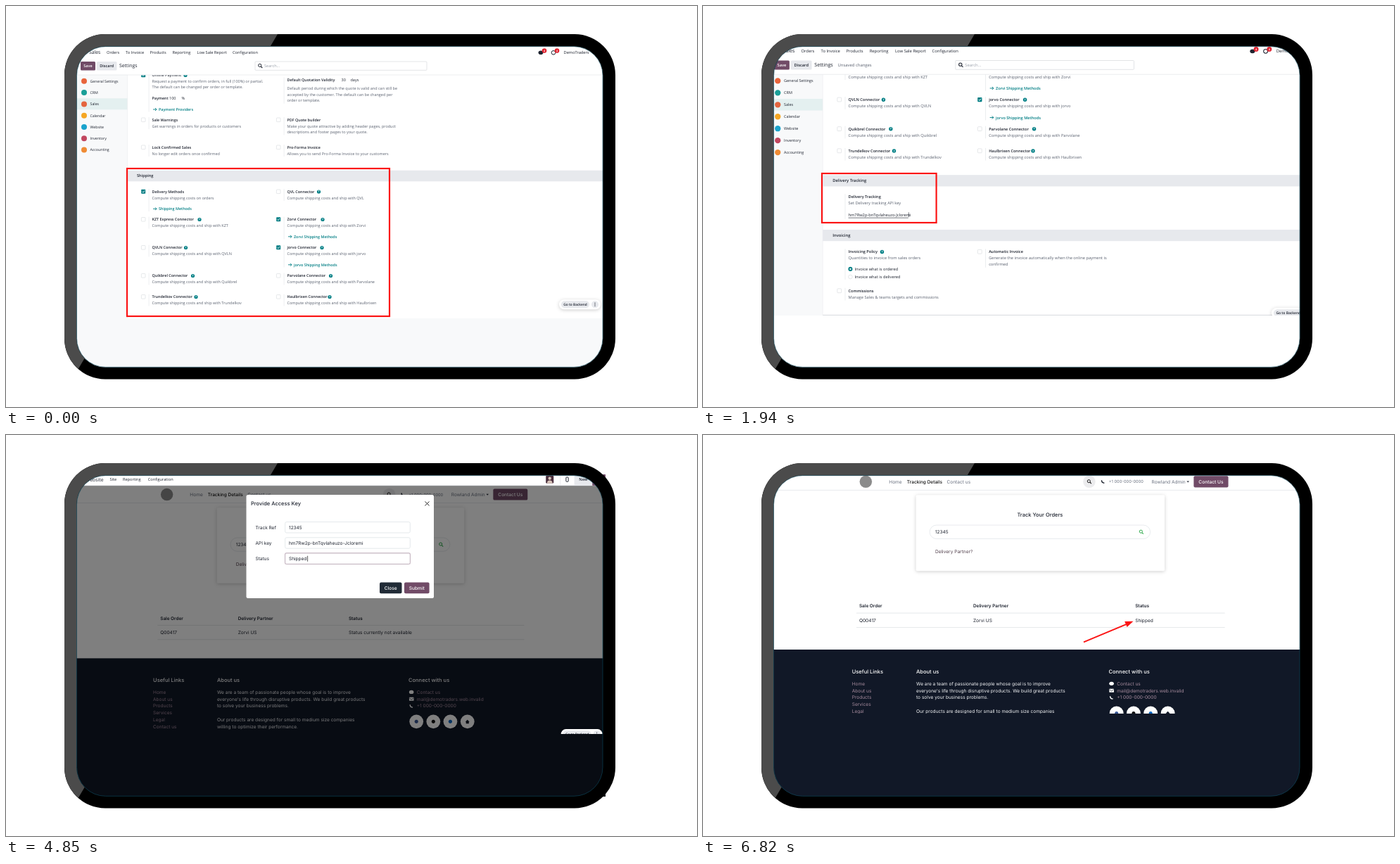
An HTML page for the animation above (7820 ms loop, 982x570 px).

```html
<!DOCTYPE html>
<html lang="en">
<head>
<meta charset="utf-8">
<title>Delivery tracking tour</title>
<style>
  html, body { margin: 0; width: 100%; height: 100%; overflow: hidden; background: #fff; }
  #stage { display: block; width: 982px; height: 570px; }
  text { text-rendering: geometricPrecision; }
  .ui { font-family: "Open Sans", "Noto Sans", sans-serif; }
  .web { font-family: Inter, Roboto, sans-serif; }
  /* Each scene shows for 1000 ms; a later one covers the tail of the one before. */
  .scene { animation: show 7820ms step-end infinite; }
  @keyframes show {
    0% { visibility: visible; }
    12.788%, 100% { visibility: hidden; }
  }
</style>
</head>
<body>
<svg id="stage" viewBox="0 0 982 570"></svg>
<script>
const TEAL = '#017e84', PLUM = '#714b67', INK = '#1f2430', GREY = '#6b7280', NAVY = '#111827', RED = '#fb1414';
const API_KEY = 'hm7Rw2p-bnTqvlaheuzo-Jcloremi';

// Drawing helpers; text y is the visual middle of the line.
const text = (x, y, s, size, fill = INK, weight = 400, anchor = 'start') =>
  `<text x="${x}" y="${y + size * 0.35}" font-size="${size}" fill="${fill}" font-weight="${weight}" text-anchor="${anchor}">${s}</text>`;
const box = (x, y, w, h, fill, r = 0, more = '') =>
  `<rect x="${x}" y="${y}" width="${w}" height="${h}" rx="${r}" fill="${fill}" ${more}/>`;
const dot = (x, y, r, fill) => `<circle cx="${x}" cy="${y}" r="${r}" fill="${fill}"/>`;
const line = (d, stroke, w = 0.7) => `<path d="${d}" fill="none" stroke="${stroke}" stroke-width="${w}"/>`;
const frame = (x, y, w, h) => box(x, y, w, h, 'none', 0, `stroke="${RED}" stroke-width="2.2"`);
const place = (scale, dx, dy, body) => `<g transform="translate(${dx} ${dy}) scale(${scale})">${body}</g>`;
const clip = (x, y, x2, y2, body) =>
  `<svg x="${x}" y="${y}" width="${x2 - x}" height="${y2 - y}" viewBox="${x} ${y} ${x2 - x} ${y2 - y}">${body}</svg>`;
const shadowed = (x, y, w, h, r) =>
  box(x, y, w, h, '#fff', r, 'style="filter:drop-shadow(0 1px 2.5px rgba(0,0,0,.2))"');
const lens = (x, y, color) =>
  `<circle cx="${x - 0.6}" cy="${y - 0.6}" r="2.1" fill="none" stroke="${color}" stroke-width="1"/>` +
  line(`M${x + 1} ${y + 1}l2 2`, color, 1.1);
const handset = (x, y, color) => line(`M${x - 2} ${y - 2}q0 4 4 4`, color, 1.5);
const button = (x, y, w, h, label, fill, size = 6.6) =>
  box(x, y, w, h, fill, 2) + text(x + w / 2, y + h / 2, label, size, '#fff', 500, 'middle');

const pill = (x, y) =>
  shadowed(x, y, 59, 14, 7) + box(x + 3, y + 2, 40, 10, '#e7e9ed', 5) +
  text(x + 23, y + 7, 'Go to Backend', 4.8, INK, 600, 'middle') +
  dot(x + 51, y + 7, 5, '#e7e9ed') +
  [-2, 0, 2].map(d => dot(x + 51, y + 7 + d, 0.6, INK)).join('');

// Settings page
const check = (x, y, on) => on
  ? box(x - 3, y - 3, 6, 6, TEAL, 0.8) + line(`M${x - 1.6} ${y}l1.2 1.3 2.2 -2.6`, '#fff', 0.9)
  : box(x - 2.8, y - 2.8, 5.6, 5.6, '#fff', 0.8, 'stroke="#d5d8dc" stroke-width=".6"');
const help = (x, y) => dot(x, y, 2.6, TEAL) + text(x, y, '?', 4.2, '#fff', 700, 'middle');

function item(x, y, title, lines, { on, mark, link, at = 8.6, tall = 0 } = {}) {
  let s = text(x, y, title, 5.4, INK, 600);
  lines.forEach((l, i) => s += text(x, y + at + i * 8.4, l, 5.5, '#5b6270'));
  if (on !== undefined) s += check(x - 12.3, y - 0.2, on);
  if (mark) s += help(mark, y);
  if (link) s += line(`M${x + 1.5} ${y + 24.3}h5m-2 -2l2 2l-2 2`, TEAL, 0.9) + text(x + 9.5, y + 24.4, link, 5.4, TEAL, 600);
  const h = tall || at + lines.length * 8.4 - 4 + (link ? 15 : 0);
  return s + line(`M${x - 4.4} ${y - 4}v${h + 4}`, '#dfe2e6', 0.6);
}
const carrier = (x, y, name, mark, on = false) => item(x, y, `${name} Connector`,
  [`Compute shipping costs and ship with ${name.replace(' Express', '')}`],
  { on, mark, link: on && `${name} Shipping Methods` });
const band = (y, title) => box(172.5, y, 700, 15.6, '#e7e9ed') + text(186, y + 7.8, title, 5.6, INK, 600);

function settingsBody(key) {
  const L = 207.5, R = 399.5;
  return item(L, 98.5, 'Online Payment', ['Request a payment to confirm orders, in full (100%) or partial.',
      'The default can be changed per order or template.'], { on: true, mark: 255, tall: 52 }) +
    text(L, 131, 'Payment', 5.4, INK, 600) + text(232, 131, '100', 5.5) + text(249.5, 131, '%', 5.5) +
    line('M209 147h5m-2 -2l2 2l-2 2', TEAL, 0.9) + text(217, 147, 'Payment Providers', 5.4, TEAL, 600) +
    item(R, 105.5, 'Default Quotation Validity', ['Default period during which the quote is valid and can still be',
      'accepted by the customer. The default can be changed per', 'order or template.'], { at: 12 }) +
    text(476.5, 105.5, '30', 5.5) + text(489.5, 105.5, 'days', 5.5) +
    item(L, 162, 'Sale Warnings', ['Get warnings in orders for products or customers'], { on: false }) +
    item(R, 162, 'PDF Quote builder', ['Make your quote attractive by adding header pages, product',
      'descriptions and footer pages to your quote.'], { on: false }) +
    item(L, 201, 'Lock Confirmed Sales', ['No longer edit orders once confirmed'], { on: false }) +
    item(R, 201, 'Pro-Forma Invoice', ['Allows you to send Pro-Forma Invoice to your customers'], { on: false }) +
    band(233.7, 'Shipping') +
    item(L, 264, 'Delivery Methods', ['Compute shipping costs on orders'], { on: true, link: 'Shipping Methods' }) +
    carrier(R, 264, 'QVL', 444.5) +
    carrier(L, 303.5, 'KZT Express', 275) + carrier(R, 303.5, 'Zorvi', 450, true) +
    carrier(L, 343.5, 'QVLN', 255.5) + carrier(R, 343.5, 'jorvo', 449, true) +
    carrier(L, 383.5, 'Quikbrel', 265.5) + carrier(R, 383.5, 'Parvolane', 461.5) +
    carrier(L, 413.5, 'Trundelkov', 270) + carrier(R, 413.5, 'Haulbrixen', 460) +
    band(446.4, 'Delivery Tracking') +
    item(L, 476.5, 'Delivery Tracking', ['Set Delivery tracking API key'], { tall: 30 }) +
    (key ? text(L, 500.6, key, 5.5) + line('M290 497.5v6.5', INK, 0.6) : '') +
    line(`M${L} 505h82`, INK, 0.6) +
    band(521.2, 'Invoicing') +
    item(L, 551.5, 'Invoicing Policy', ['Quantities to invoice from sales orders'], { mark: 253.6, tall: 38 }) +
    dot(210.3, 575, 2.9, TEAL) + dot(210.3, 575, 1.1, '#fff') + text(216, 575.1, 'Invoice what is ordered', 5.5) +
    '<circle cx="210.3" cy="585.7" r="2.7" fill="#fff" stroke="#d5d8dc" stroke-width=".6"/>' +
    text(216, 585.7, 'Invoice what is delivered', 5.5) +
    item(R, 551.5, 'Automatic Invoice', ['Generate the invoice automatically when the online payment is', 'confirmed'], { on: false }) +
    item(L, 604.9, 'Commissions', ['Manage Sales &amp; teams targets and commissions'], { on: false }) +
    line('M172.5 638h615', '#cfd2d8', 0.8);
}

function settings({ scroll = 0, key = '', edited = false }) {
  const menu = [['Orders', 143], ['To Invoice', 170], ['Products', 204.5], ['Reporting', 236.5],
    ['Low Sale Report', 271.5], ['Configuration', 322]];
  const apps = [['General Settings', '#e8643c'], ['CRM', '#1a9f98'], ['Sales', '#e4653f'], ['Calendar', '#f5a623'],
    ['Website', '#1aa3cc'], ['Inventory', '#c2475f'], ['Accounting', '#ef8b34']];
  const badge = x => dot(x, 63.5, 3.3, '#e0222f') + text(x, 63.5, '4', 3.6, '#fff', 700, 'middle');
  return `<g class="ui">` + box(90, 40, 800, 620, '#fff') +
    box(90, 98, 82.5, 560, '#f8f9fa') + box(90, 131.3, 82.5, 16, '#e4f0f0') +
    apps.map(([name, color], i) => {
      const y = 106.8 + i * 16.3;
      return dot(111, y, 4, color) + text(119.5, y, name, 5.25);
    }).join('') +
    clip(172, 98, 900, 650, `<g transform="translate(0 ${-scroll})">${settingsBody(key)}</g>`) +
    line('M90 98h800', '#dfe2e6', 0.6) + line('M172.5 98v550', '#e7e9ed', 0.5) +
    dot(110, 66, 4, '#e4653f') + text(118, 66, 'Sales', 6.8) +
    menu.map(([s, x]) => text(x, 66, s, 5.65)).join('') +
    `<ellipse cx="760" cy="66.3" rx="3.4" ry="2.8" fill="${INK}"/>` + badge(765) +
    `<circle cx="778" cy="66.3" r="2.8" fill="none" stroke="${INK}"/>` + badge(783) +
    text(792.5, 66, 'DemoTraders', 5.7) +
    box(106, 79, 21, 12.5, PLUM, 1.5) + text(116.5, 85.2, 'Save', 5.5, '#fff', 600, 'middle') +
    box(129, 79, 28.5, 12.5, '#e7e9ed', 1.5) + text(143.2, 85.2, 'Discard', 5.5, INK, 600, 'middle') +
    text(161, 85, 'Settings', 6.9) + (edited ? text(193, 85, 'Unsaved changes', 5.7, '#5b6270') : '') +
    box(354, 79, 244, 12.3, '#fff', 1, 'stroke="#d8dadd" stroke-width=".7"') +
    lens(361.3, 85, INK) + text(367, 85, 'Search...', 5.6, '#9aa0aa') + pill(786, 417.2) + '</g>';
}

// Website page
function topBar() {
  return '<g class="ui">' + box(90, 40, 790, 34.5, '#fff') + line('M90 74.5h790', '#dcdfe3', 0.5) +
    dot(109, 65.5, 4.5, '#1aa3cc') + text(114.4, 65.5, 'Website', 7.05) + text(150, 65.5, 'Site', 5.8) +
    text(169, 65.5, 'Reporting', 5.8) + text(206, 65.5, 'Configuration', 5.8) +
    box(789.8, 59.8, 11.4, 11.4, '#4a2f3d', 1.5) + dot(795.5, 64, 2.2, '#d9c4ba') +
    '<path d="M791.5 71.2q0 -4.4 4 -4.4t4 4.4z" fill="#d9c4ba"/>' +
    line('M811 56v18.5', '#dcdfe3', 0.6) + box(819.4, 62.3, 3.4, 6.4, 'none', 0.7, `stroke="${INK}"`) +
    box(831.5, 40, 26.5, 34.5, '#e7e9ed') + text(844.7, 65.5, 'New', 5.8, INK, 600, 'middle') +
    box(858, 40, 40, 34.5, PLUM) + '</g>';
}

function footer() {
  const ROSE = '#a58a9c', row = i => 377.6 + i * 10.2;
  const about = ['We are a team of passionate people whose goal is to improve',
    "everyone's life through disruptive products. We build great products",
    'to solve your business problems.', '',
    'Our products are designed for small to medium size companies', 'willing to optimize their performance.'];
  const house = '<path d="M671.6 421.2l3.1 -3 3.1 3h-1v2.6h-4.2v-2.6z" fill="#111827"/>';
  return box(90, 328, 800, 260, NAVY) +
    [['Useful Links', 213.5], ['About us', 307.3], ['Connect with us', 588.3]]
      .map(([s, x]) => text(x, 360.2, s, 7.75, '#fff', 500)).join('') +
    ['Home', 'About us', 'Products', 'Services', 'Legal', 'Contact us']
      .map((s, i) => text(213.5, row(i), s, 6.75, ROSE)).join('') +
    about.map((s, i) => text(307.3, row(i), s, 6.77, '#f3f4f6')).join('') +
    `<ellipse cx="592.5" cy="${row(0)}" rx="3.4" ry="2.7" fill="#fff"/>` +
    box(589.2, row(1) - 2.6, 6.8, 5.2, '#fff', 0.6) + line(`M589.4 ${row(1) - 1.6}l3.2 2.4 3.2 -2.4`, NAVY, 0.7) +
    handset(592.5, row(2), '#fff') +
    ['Contact us', 'mail@demotraders.web.invalid', '+1 000-000-0000']
      .map((s, i) => text(600.3, row(i), s, 6.75, ROSE)).join('') +
    [599.8, 624.7, 649.6, 674.7].map(x => dot(x, 420.9, 10.2, '#fff')).join('') +
    ['#3b5998', '#111111', '#0a66c2'].map((c, i) => dot(599.8 + i * 24.9, 420.9, 2.6, c)).join('') + house;
}

function site({ query = '', cols, status, drop = 0 }) {
  const heads = ['Sale Order', 'Delivery Partner', 'Status'], cells = ['Q00417', 'Zorvi US', status];
  return '<g class="web">' + box(90, 40, 800, 500, '#fff') +
    shadowed(307, 107, 363, 111, 2) + text(488, 135.6, 'Track Your Orders', 7.7, INK, 500, 'middle') +
    box(327, 151, 322, 20, '#fff', 10, 'stroke="#e2e5e9" stroke-width=".8"') + text(335, 161, query, 6.7) +
    lens(636, 161, '#28a745') + text(335, 189.8, 'Delivery Partner?', 6.75, '#55434f') +
    (cols ? cols.map((x, i) => text(x, 269.2, heads[i], 6.6, INK, 600) + text(x, 290.2, cells[i], 6.78)).join('') +
      line('M220 279.5h538M220 300.5h538', '#dee2e6', 0.8) : '') +
    `<g transform="translate(0 ${drop})">${footer()}</g>` +
    box(90, 74.5, 800, 25.5, '#fff') + line('M90 100h800', '#e2e5e9', 0.8) +
    dot(233.7, 87.6, 9, '#8b8b8b') +
    text(267.5, 87.6, 'Home', 6.75, GREY) + text(293.8, 87.6, 'Tracking Details', 6.7, '#111', 500) +
    text(352, 87.6, 'Contact us', 6.75, GREY) +
    dot(560, 87.5, 9, '#ececee') + lens(560, 87.5, '#111') + handset(580, 87.5, INK) +
    text(588.5, 87.6, '+1 000-000-0000', 5.9, GREY) + text(651, 87.6, 'Rowland Admin', 6.75, GREY) +
    `<path d="M702.3 86.7h3.6l-1.8 2z" fill="${INK}"/>` +
    button(712.5, 79.3, 50.5, 16.6, 'Contact Us', PLUM, 6.8) + '</g>';
}

const shade = () => box(90, 40, 800, 520, '#000', 0, 'opacity=".5"');
const cross = (x, y) => line(`M${x - 3} ${y - 3}l6 6m0 -6l-6 6`, '#111', 0.9);
const badgePill = () => `<g class="ui">${place(1.03, 812 - 786 * 1.03, 432 - 417 * 1.03, pill(786, 417))}</g>`;

function keyDialog() {
  const rows = [['Track Ref', '12345'], ['API key', API_KEY], ['Status', 'Shipped']];
  return '<g class="web">' + box(341.5, 85, 266.5, 147, '#fff', 2.5) +
    text(348, 97.6, 'Provide Access Key', 7.5, INK, 500) + cross(598.5, 97.5) +
    rows.map(([label, value], i) => {
      const y = 131.3 + i * 22.2, edge = i == 2 ? '#b8a5b3' : '#dee2e6';
      return (i == 2 ? box(395.8, y - 8.6, 179.4, 17.2, '#e3dbe1', 2.5) : '') +
        box(396.7, y - 7.7, 177.6, 15.4, '#fff', 2, `stroke="${edge}" stroke-width=".8"`) +
        text(354.5, y, label, 6.5) + text(402, y, value, 6.5);
    }).join('') + line('M428.6 171.8v8', '#111', 0.7) +
    button(531, 209.6, 31.5, 15.6, 'Close', '#212b36') + button(566, 209.6, 35.6, 15.6, 'Submit', PLUM) + '</g>';
}
const successDialog = () => '<g class="web">' + box(344, 90, 265, 94.5, '#fff', 2.5) +
  text(350.5, 102.2, 'SUCCESS', 7.5, INK, 500) +
  box(592, 95.2, 14, 14, '#fff', 2.5, 'stroke="#bfb0bb" stroke-width="1"') + cross(599, 102.2) +
  text(357, 134, 'Successfully updated the Delivery Status', 8.9, '#28a745', 500) +
  button(571, 163, 31.5, 15.4, 'Close', '#212b36') + '</g>';

const arrow = line('M541 294.3L602 268.8', RED, 2) + `<path d="M611.5 264.8L602.6 272.9L599.2 264.9z" fill="${RED}"/>`;

// Scenes: rest is the colour of the screen below the cropped page.
const screen = (x2, y2, rest, body) => box(100, 300, x2 - 100, 214, rest) + clip(100, 56, x2, y2, body);
const settingsAt = o => place(1.0395, -9.15, -4.6, settings({ scroll: 210.9, ...o }));
const pending = { query: '12345', cols: [224, 338, 500.4], status: 'Status currently not available' };
const trackingBox = frame(169, 238, 162.6, 70);

const scenes = [
  [0, screen(849, 444, '#f8f9fa', settings({})) + frame(172, 231, 373, 210)],
  [970, screen(849, 480, '#f8f9fa', settingsAt({})) + trackingBox],
  [1940, screen(849, 440, '#fff', settingsAt({ key: API_KEY, edited: true })) + trackingBox],
  [2910, screen(854, 396, NAVY, place(0.9685, 2.3, -0.27, site({}) + topBar()))],
  [3880, screen(849, 396, NAVY, site(pending) + topBar()) + frame(324, 144, 49, 31.5) + frame(205.5, 261, 429.5, 42)],
  [4850, screen(852, 425, '#080c13',
    place(0.9685, 2.3, -0.27, site(pending) + shade() + topBar() + badgePill()) + keyDialog())],
  [5820, screen(855, 514, '#04060a',
    place(0.9624, 6.9, 5.27, site(pending) + shade()) + place(0.9945, 4.4, 5.3, keyDialog()) + shade() +
    place(0.9624, 6.9, 5.27, topBar() + badgePill()) + successDialog())],
  [6820, screen(849, 396, NAVY, place(0.9733, 3.9, -18.9,
    site({ query: '12345', cols: [224, 390.5, 627], status: 'Shipped', drop: 4.8 }) + topBar())) + arrow],
];

const round = (x, y, x2, y2, r) => `M${x + r} ${y}H${x2 - r}A${r} ${r} 0 0 1 ${x2} ${y + r}V${y2 - r}` +
  `A${r} ${r} 0 0 1 ${x2 - r} ${y2}H${x + r}A${r} ${r} 0 0 1 ${x} ${y2 - r}V${y + r}A${r} ${r} 0 0 1 ${x + r} ${y}z`;
const ring = round(83, 40, 866, 530.5, 58) + round(100.3, 57.4, 848.2, 513.5, 41);
const bezel = `<path d="${ring}" fill-rule="evenodd"/>` +
  `<path d="${ring}" fill="#4b4b4b" fill-rule="evenodd" style="clip-path:polygon(0 0,302.5px 0,303px 0,11px 490.5px,0 490.5px)"/>` +
  `<path d="${round(100.5, 57.6, 848, 513.3, 41)}" fill="none" stroke="#0d4a5e" stroke-width=".6"/>`;

document.getElementById('stage').innerHTML = scenes.map(([at, body]) =>
  `<g class="scene" style="animation-delay:${at - 7820}ms">${box(0, 0, 982, 570, '#fff')}${body}</g>`).join('') + bezel;
</script>
</body>
</html>
```
